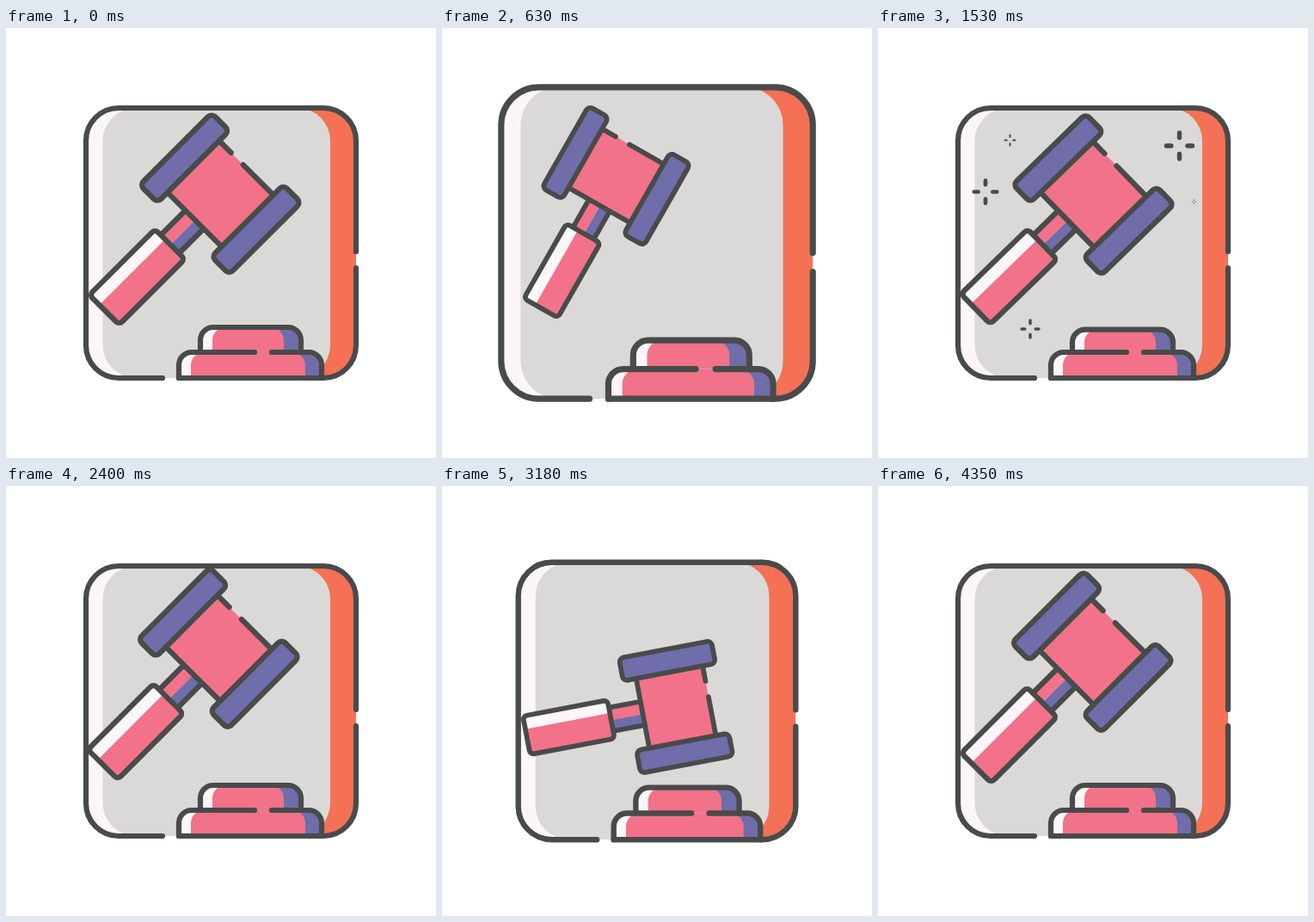
An HTML page that plays this animation: 500x500 px, repeating every 4500 ms.

```html
<!DOCTYPE html>
<html lang="en">
<head>
<meta charset="utf-8">
<title>Gavel</title>
<style>
  html, body { margin: 0; width: 100%; height: 100%; overflow: hidden; background: #fff; }
  svg { display: block; width: 100%; height: 100%; }
  .line { fill: none; stroke: #484b4a; stroke-width: 6.2; stroke-linecap: round; stroke-linejoin: round; }
  .pink { fill: #f27289; }
  .purple { fill: #6f6daa; }
  .pale { fill: #fdf6f8; }
  .orange { fill: #f47155; }
  .gray { fill: #dad9d7; }
</style>
</head>
<body>
<svg viewBox="0 0 500 500">
  <defs>
    <clipPath id="panelClip"><rect x="93" y="93" width="314" height="314" rx="38"/></clipPath>
    <clipPath id="upperClip"><path id="upperClipPath"/></clipPath>
    <clipPath id="lowerClip"><path d="M201 407V392a15 15 0 0 1 15-15H352a15 15 0 0 1 15 15V407Z"/></clipPath>
    <clipPath id="gripClip"><rect x="-191" y="-24.5" width="108" height="49" rx="5"/></clipPath>
    <g id="star">
      <path class="line" style="stroke-width:5.4"
        d="M-15.2 0H-9.6M9.6 0H15.2M0-15.2V-9.6M0 9.6V15.2"/>
    </g>
  </defs>

  <g id="panel">
    <g clip-path="url(#panelClip)">
      <rect class="pale" x="93" y="93" width="157" height="314"/>
      <rect class="orange" x="250" y="93" width="157" height="314"/>
      <rect class="gray" x="112.5" y="93" width="264.5" height="314" rx="38"/>
    </g>
    <g clip-path="url(#upperClip)">
      <rect class="pale" x="226" y="340" width="60" height="40"/>
      <rect class="purple" x="284" y="340" width="60" height="40"/>
      <rect id="upperFill" class="pink" x="240" width="83" height="60" rx="15"/>
    </g>
    <path id="upperLine" class="line"/>
    <g clip-path="url(#lowerClip)">
      <rect class="pale" x="201" y="377" width="84" height="30"/>
      <rect class="purple" x="284" y="377" width="84" height="30"/>
      <rect class="pink" x="215" y="377" width="133" height="60" rx="15"/>
    </g>
    <path class="line" d="M201 407V392a15 15 0 0 1 15-15H289M309 377H352a15 15 0 0 1 15 15V407"/>
    <path class="line" d="M182 407H131a38 38 0 0 1-38-38V131a38 38 0 0 1 38-38H369a38 38 0 0 1 38 38V260M407 279V369a38 38 0 0 1-38 38H201"/>
  </g>

  <g id="stars"></g>

  <g id="gavel">
    <rect class="pink" x="-83" y="-15" width="42" height="16"/>
    <rect class="purple" x="-83" y="1" width="42" height="14"/>
    <path class="line" d="M-83-15H-43M-83 15H-43"/>
    <g clip-path="url(#gripClip)">
      <rect class="pale" x="-191" y="-25" width="108" height="18"/>
      <rect class="pink" x="-191" y="-8" width="108" height="33"/>
    </g>
    <rect class="line" x="-191" y="-24.5" width="108" height="49" rx="5"/>
    <rect class="pink" x="-42.5" y="-44" width="85" height="88"/>
    <path class="line" d="M-42.5-44V44M42.5-44V-25M42.5-5V44"/>
    <g id="bands"></g>
  </g>
</svg>

<script>
const LOOP = 4500, BEAT = 2250, STEP = 30;
const byId = id => document.getElementById(id);
const clamp = v => Math.max(0, Math.min(1, v));
const smooth = v => { const c = clamp(v); return c * c * (3 - 2 * c); };

// time, then values; eased between neighbours
function sample(keys, t) {
  let i = 0;
  while (i < keys.length - 2 && t >= keys[i + 1][0]) i++;
  const [a, b] = [keys[i], keys[i + 1]];
  const k = smooth((t - a[0]) / (b[0] - a[0]));
  return a.slice(1).map((v, n) => v + (b[n + 1] - v) * k);
}

// time, head x, head y, angle, scale
const gavelKeys = [
  [0, 249.3, 192.7, -45, 1],
  [150, 247.4, 188.6, -45.1, 1],
  [600, 201.4, 170.6, -61.1, 0.926],
  [1050, 287.1, 275.4, 0, 0.926],
  [1500, 250.5, 193.6, -44.2, 1],
  [2100, 249.3, 192.7, -45, 1]
];
const panelKeys = [[150, 1], [600, 1.156], [1050, 1]];

// peaks: time of full size within the first and the second beat
const starSpecs = [
  { x: 153.5, y: 130.5, size: 16, peaks: [1720, 1530] },
  { x: 125, y: 190.5, size: 16, peaks: [1500, 1265] },
  { x: 350.5, y: 137, size: 18, peaks: [1510, 1510] },
  { x: 367.5, y: 202, size: 18, peaks: [1265, 1612] },
  { x: 177, y: 350, size: 12, peaks: [1560, 1635] }
];
const STAR_HALF_LIFE = 350;

byId("bands").innerHTML = [-59, 59].map(y =>
  `<rect class="line" style="fill:#6f6daa" x="-59" y="${y - 14.5}" width="118" height="29" rx="6"/>`).join("");
byId("stars").innerHTML = starSpecs.map(() => `<use href="#star"/>`).join("");
const starNodes = [...byId("stars").children];

function squash(t) {
  if (t < 1020) return 0;
  const left = 1 - clamp((t - 1080) / 1020);
  return 8.5 * smooth((t - 1020) / 60) * left * left;
}

function drawUpperBlock(top) {
  const d = `M226 377V${top + 15}a15 15 0 0 1 15-15H328a15 15 0 0 1 15 15V377`;
  byId("upperLine").setAttribute("d", d);
  byId("upperClipPath").setAttribute("d", d + "Z");
  byId("upperFill").setAttribute("y", top);
}

function render(time) {
  const beat = Math.floor(time / BEAT);
  const t = time % BEAT;

  const [zoom] = sample(panelKeys, t);
  byId("panel").setAttribute("transform", `translate(250 250) scale(${zoom}) translate(-250 -250)`);
  drawUpperBlock(348 + squash(t));

  const [x, y, angle, scale] = sample(gavelKeys, t);
  byId("gavel").setAttribute("transform", `translate(${x} ${y}) rotate(${angle}) scale(${scale})`);

  starSpecs.forEach((s, i) => {
    const k = smooth(1 - Math.abs(t - s.peaks[beat]) / STAR_HALF_LIFE) * s.size / 18;
    starNodes[i].setAttribute("transform", `translate(${s.x} ${s.y}) scale(${k})`);
    starNodes[i].setAttribute("visibility", k > 0 ? "visible" : "hidden");
  });
}

const start = performance.now();
function tick() {
  const time = (performance.now() - start) % LOOP;
  render(Math.floor(time / STEP) * STEP);
  requestAnimationFrame(tick);
}
tick();
</script>
</body>
</html>
```
